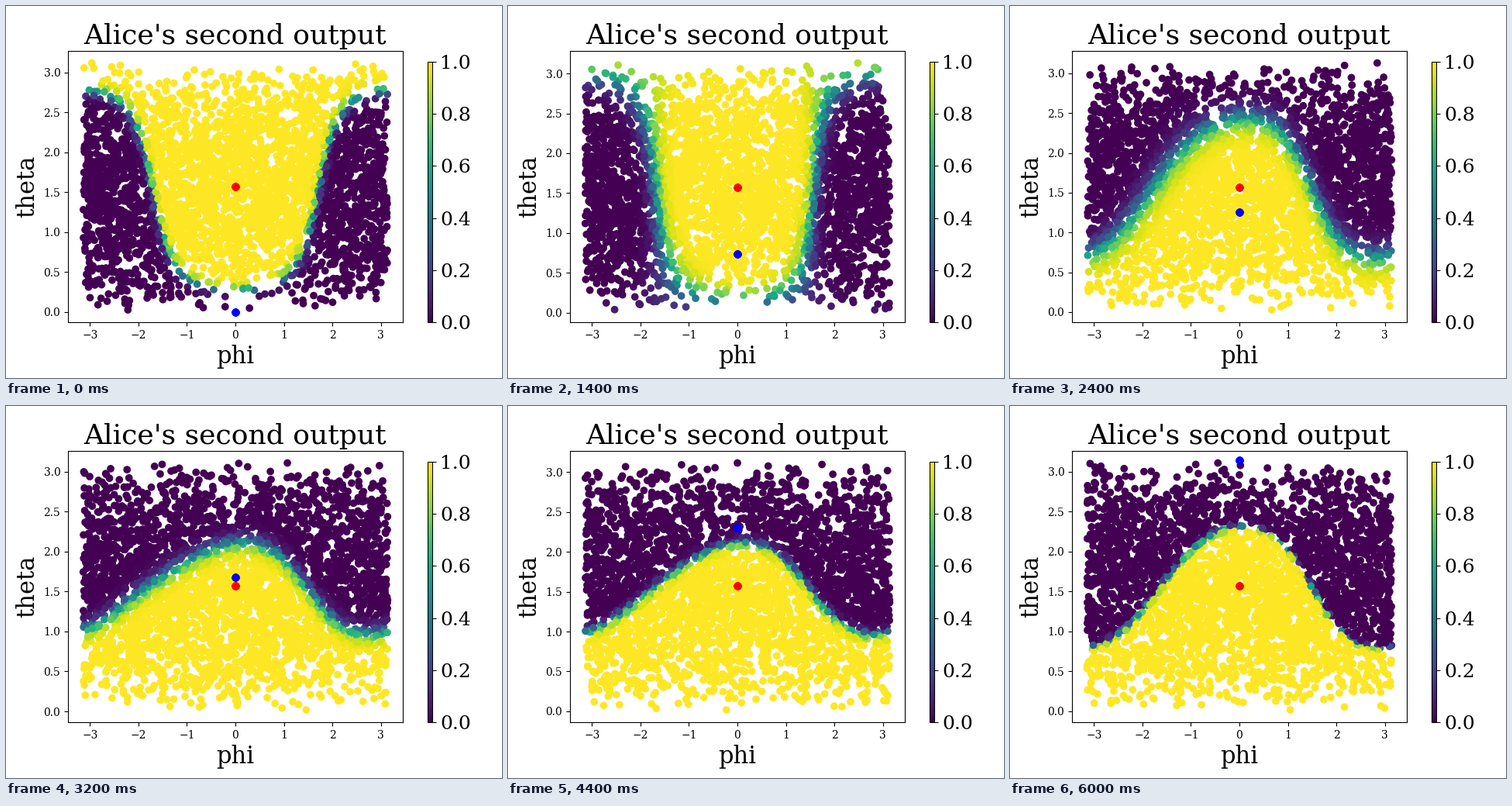
A matplotlib script for the animation above (6200 ms loop, 640 px wide and 480 px high).

```python
import numpy as np
import matplotlib.pyplot as plt
from matplotlib.animation import FuncAnimation
from matplotlib.cm import ScalarMappable

FRAMES, INTERVAL = 31, 200
POINTS = 3400
COPIES = 30

plt.rcParams["font.family"] = "DejaVu Serif"
fig, ax = plt.subplots(figsize=(6.4, 4.8), dpi=100)
fig.subplots_adjust(left=0.125, right=0.8, bottom=0.15, top=0.88)
ax.set_title("Alice's second output", fontsize=26)
ax.set_xlabel("phi", fontsize=22)
ax.set_ylabel("theta", fontsize=22)
ax.set_xlim(-1.1 * np.pi, 1.1 * np.pi)

cloud = ax.scatter(np.zeros(POINTS), np.zeros(POINTS), c=np.zeros(POINTS),
                   cmap="viridis", vmin=0, vmax=1)


def marker(theta, color):
    # stacked copies give the dot its hard edge
    return ax.scatter(np.zeros(COPIES), np.full(COPIES, theta),
                      color=color, zorder=3)


marker(np.pi / 2, "red")
probe = marker(0, "blue")

cax = fig.add_axes([0.85, 0.15, 0.01, 0.7])
bar = fig.colorbar(ScalarMappable(cmap="viridis"), cax=cax)
bar.ax.tick_params(labelsize=18)


def sample(step):
    """Random points on the sphere, with evenly filled heights."""
    rng = np.random.default_rng(100 + step)
    phi = rng.uniform(-np.pi, np.pi, POINTS)
    height = (rng.permutation(POINTS) + rng.random(POINTS)) / POINTS
    return phi, np.arccos(1 - 2 * height)


def output(phi, theta, step):
    """Sigmoid of a slightly skewed plane that turns and sharpens."""
    pole = np.interp(step, [0, 7, 12, 30], [-10, -2.2, 8, 44])
    lift = np.interp(step, [0, 7, 30], [5, 0.9, -1.5])
    tilt = 9 + 0.12 * (step - 13.5) ** 2
    skew = 0.1 * step
    wave = (lift + tilt * np.cos(phi)
            + skew * (np.sin(2 * phi) - np.sin(phi)))
    logit = pole * np.cos(theta) + wave * np.sin(theta)
    return 0.5 * (1 + np.tanh(logit / 2))


def update(step):
    phi, theta = sample(step)
    cloud.set_offsets(np.column_stack([phi, theta]))
    cloud.set_array(output(phi, theta, step))
    lo, hi = theta.min(), theta.max()
    pad = 0.05 * (hi - lo)
    ax.set_ylim(lo - pad, hi + pad)
    angle = np.pi * step / (FRAMES - 1)
    probe.set_offsets([(0, angle)] * COPIES)
    return cloud, probe


anim = FuncAnimation(fig, update, frames=FRAMES, interval=INTERVAL,
                     repeat=True, repeat_delay=0, blit=False)
plt.show()
```
